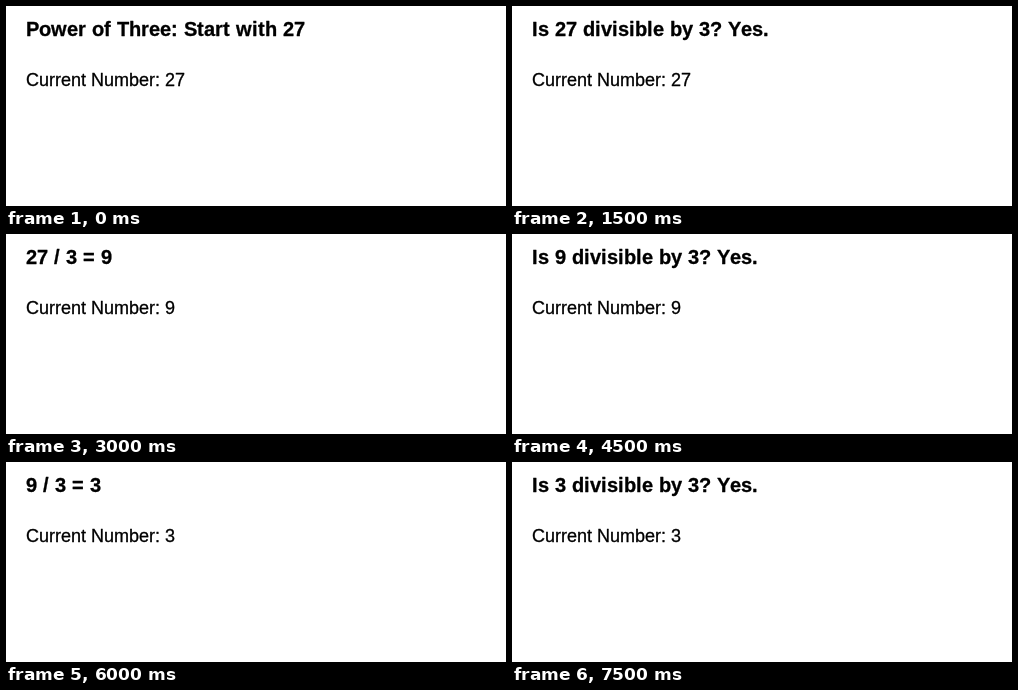
Animation of 500 by 200 pixels, one loop 8000 ms. Source, as an HTML page with a canvas:

```html
<!DOCTYPE html>
<html lang="en">
<head>
<meta charset="utf-8">
<title>Power of Three</title>
<style>
  html, body { margin: 0; width: 100%; height: 100%; overflow: hidden; background: #fff; }
  canvas { display: block; }
</style>
</head>
<body>
<canvas id="stage" width="500" height="200"></canvas>
<script>
  const ctx = document.getElementById("stage").getContext("2d");
  const FONT = "Arial, 'Liberation Sans', sans-serif";
  const START = 27;
  const STEP = 1500;
  const LOOP = 8000;

  // Steps alternate between testing the number and dividing it by 3.
  function stateAt(step) {
    const value = START / 3 ** Math.floor(step / 2);
    if (step === 0) return { title: `Power of Three: Start with ${value}`, value };
    if (step % 2) return { title: `Is ${value} divisible by 3? Yes.`, value };
    return { title: `${value * 3} / 3 = ${value}`, value };
  }

  // Letters advance by whole pixels; a hairline gives the smoothed weight.
  function drawText(text, font, y) {
    ctx.font = `${font} ${FONT}`;
    let x = 20;
    for (const letter of text) {
      ctx.fillText(letter, x, y);
      ctx.strokeText(letter, x, y);
      x += Math.round(ctx.measureText(letter).width);
    }
  }

  function draw(time) {
    const { title, value } = stateAt(Math.floor((time % LOOP) / STEP));
    ctx.fillStyle = "#fff";
    ctx.fillRect(0, 0, 500, 200);
    ctx.fillStyle = ctx.strokeStyle = "#000";
    ctx.lineWidth = 0.3;
    ctx.lineJoin = "round";
    drawText(title, "bold 20px", 30);
    drawText(`Current Number: ${value}`, "18px", 80);
  }

  const start = performance.now();
  function tick() {
    draw(performance.now() - start);
    requestAnimationFrame(tick);
  }
  tick();
</script>
</body>
</html>
```
